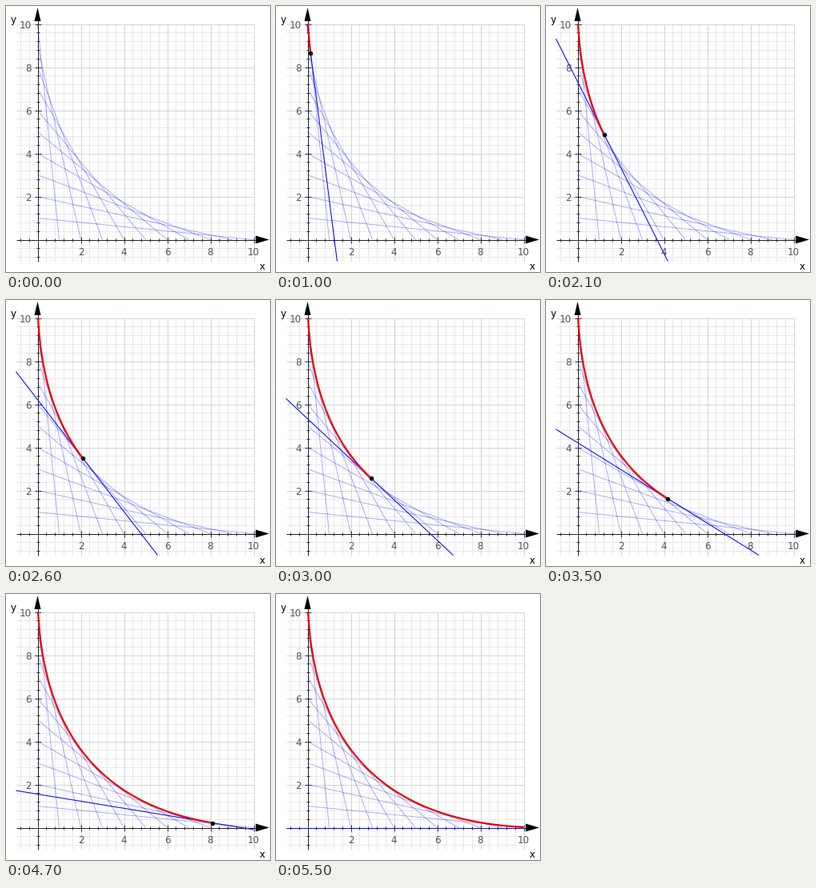
Recreate the animation shown at these times as a matplotlib script. Size 330 by 333 pixels, loop 8 s.

```python
import numpy as np
import matplotlib.pyplot as plt
from matplotlib.animation import FuncAnimation

W, H, DPI = 330, 333, 100
PX = 72 / DPI                 # one pixel in points
X0, Y0, UNIT = 39.5, 292.5, 27
SUM = 11                      # sum of the intercepts of every tangent
LOW, HIGH = -1, 10            # plotted range on both axes
START, STEP, MOVES = 0.13, 0.2218, 51

plt.rcParams["toolbar"] = "None"
fig = plt.figure(figsize=(W / DPI, H / DPI), dpi=DPI, facecolor="white")
ax = fig.add_axes([0, 0, 1, 1])
ax.set(xlim=(0, W), ylim=(H, 0))
ax.axis("off")


def sx(x):
    return X0 + UNIT * np.asarray(x, float)


def sy(y):
    return Y0 - UNIT * np.asarray(y, float)


def seg(x, y, color, width=1, **kw):
    kw.setdefault("solid_capstyle", "butt")
    return ax.plot(x, y, color=color, lw=width * PX, **kw)[0]


def label(x, y, text, color="#555555", **kw):
    ax.text(x, y, text, family="DejaVu Sans", size=12 * PX, color=color, **kw)


def draw_grid():
    lo, hi = sx(LOW), sx(HIGH)
    top, bottom = sy(HIGH), sy(LOW)
    for k in range(-2, 26):
        v = 0.4 * k
        major = k % 5 == 0
        color = "#cfd6d6" if major else "#e8e8ec"
        z = 1.5 if major else 1
        seg([sx(v)] * 2, [top, bottom], color, zorder=z)
        seg([lo, hi], [sy(v)] * 2, color, zorder=z)


def draw_axes():
    seg([sx(LOW), 315], [Y0, Y0], "#222222", zorder=3)
    seg([X0, X0], [sy(LOW), 17], "#222222", zorder=3)
    ax.fill([329, 312, 312], [Y0, Y0 - 5, Y0 + 5], "black", lw=0, zorder=3)
    ax.fill([X0, X0 - 4, X0 + 4], [2, 19, 19], "black", lw=0, zorder=3)
    for k in range(-2, 26):
        size = 4 if k % 5 == 0 else 2
        v = 0.4 * k
        seg([sx(v)] * 2, [Y0 - size, Y0 + size], "#333333", zorder=3)
        seg([X0 - size, X0 + size], [sy(v)] * 2, "#333333", zorder=3)
    for v in range(2, 11, 2):
        label(sx(v), 311.5, str(v), ha="center", va="baseline")
        label(32, sy(v) + 5, str(v), ha="right", va="baseline")
    label(316.5, 330, "x", "black")
    label(5.5, 21, "y", "black")


def touch(a):
    """Point where the line with x-intercept a meets its envelope."""
    return a * a / SUM, (SUM - a) ** 2 / SUM


def tangent(a):
    """Ends of the tangent inside the plotted square."""
    b = SUM - a
    if b < 1e-9:
        return [LOW, HIGH], [0, 0]
    x = np.array([max(LOW, a * (1 - HIGH / b)), min(HIGH, a * (1 - LOW / b))])
    return x, b * (1 - x / a)


draw_grid()
draw_axes()
for k in range(1, 11):
    seg(sx([0, k]), sy([SUM - k, 0]), "#0000ff", alpha=0.32, zorder=4)

line = seg([], [], "#1010f0", 1.1, zorder=5)
curve = seg([], [], "#ee0000", 2.2, zorder=6)
dot, = ax.plot([], [], "o", color="black", ms=5.5 * PX, mew=0, zorder=7)

A_MIN = SUM - np.sqrt(HIGH * SUM)
A_MAX = SUM - A_MIN


def update(i):
    step = i - 5
    for art in (line, curve, dot):
        art.set_data([], [])
    if step >= 0:
        a = min(SUM, START + STEP * min(step, MOVES - 1))
        x, y = tangent(a)
        line.set_data(sx(x), sy(y))
        if a > A_MIN:
            x, y = touch(np.linspace(A_MIN, min(a, A_MAX), 150))
            curve.set_data(sx(x), sy(y))
        if A_MIN <= a <= A_MAX:
            x, y = touch(a)
            dot.set_data([sx(x)], [sy(y)])
    return line, curve, dot


anim = FuncAnimation(fig, update, frames=80, interval=100, repeat=True,
                     repeat_delay=0, blit=False)
plt.show()
```
